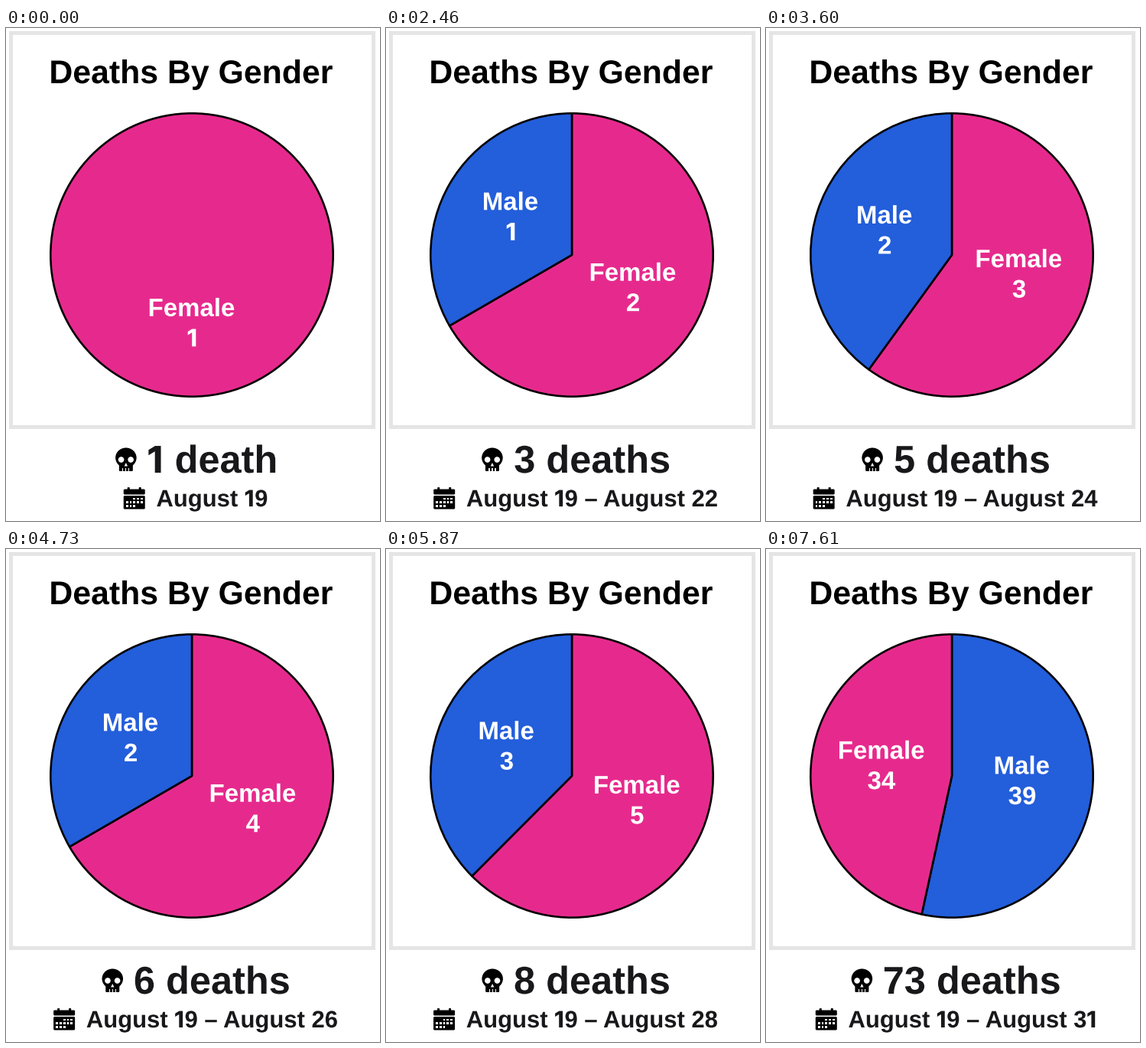
Recreate the animation shown at these times as a matplotlib script. Size 489 px wide and 643 px high, loop 8 s.

```python
from itertools import groupby

import matplotlib.pyplot as plt
import numpy as np
from matplotlib.animation import FuncAnimation
from matplotlib.patches import (Circle, Ellipse, FancyBboxPatch, PathPatch, Polygon,
                                Rectangle, Wedge)
from matplotlib.path import Path
from matplotlib.textpath import TextPath

W, H, DPI = 489, 643, 64
LOOP, STEP = 8000, 20
PX = 72 / DPI

PINK, BLUE, INK, GREY = "#e62a8d", "#235edb", "#18181b", "#e5e5e5"
CX, CY, R = 243, 296, 184.7
ROW_CENTER = 247.5

# One entry per day from August 19; the first day is held longer
DAILY = "F F M - F M - F F M F".split() + ["F" * 4 + "M" * 4, "F" * 24 + "M" * 32]
FIRST_DAY, HOLD, DAY_MS = 19, 1240, 577

# A footless numeral one, in em units
ONE = [(.35, 0), (.35, .692), (.2, .692), (.03, .588), (.03, .45), (.195, .55), (.195, 0)]
ONE_ADVANCE = .43

plt.rcParams["font.family"] = "Liberation Sans"
plt.rcParams["font.weight"] = "bold"

fig = plt.figure(figsize=(W / DPI, H / DPI), dpi=DPI, facecolor="white")
ax = fig.add_axes([0, 0, 1, 1])
ax.set_xlim(0, W)
ax.set_ylim(H, 0)
ax.axis("off")


def advance(s, size):
    right = lambda t: TextPath((0, 0), t, size=size).vertices[:, 0].max()
    return right(s + "n") - right("n")


def outline(s, size):
    """Text outline with y pointing down and ink starting at x = 0, and its width."""
    one = Path(ONE + ONE[:1], closed=True)
    x, verts, codes = 0, [], []
    for run in ("".join(g) for _, g in groupby(s, lambda c: c == "1" or -ord(c) * 0)):
        for part in (run if "1" in run else [run]):
            path = one if part == "1" else TextPath((0, 0), part, size=size)
            scale = size if part == "1" else 1
            if len(path.vertices):
                verts.append(path.vertices * scale + [x, 0])
                codes.append(path.codes)
            x += ONE_ADVANCE * size if part == "1" else advance(part, size)
    verts, codes = np.concatenate(verts), np.concatenate(codes)
    ink = verts[codes != Path.CLOSEPOLY, 0]
    return (verts - [ink.min(), 0]) * [1, -1], codes, np.ptp(ink)


def put(shape, x, y, color):
    verts, codes, _ = shape
    return ax.add_patch(PathPatch(Path(verts + [x, y], codes), fc=color, lw=0))


def centered(s, size, x, y, color):
    shape = outline(s, size)
    return put(shape, x - shape[2] / 2, y, color)


def fill(patch, color="black"):
    patch.set(facecolor=color, linewidth=0)
    return ax.add_patch(patch)


def box(x, y, w, h, color="black"):
    return fill(Rectangle((x, y), w, h), color)


def round_box(x, y, w, h, r):
    return fill(FancyBboxPatch((x + r, y + r), w - 2 * r, h - 2 * r,
                               boxstyle=f"round,pad={r}"))


def skull(x):
    mid, y = x + 14, 547.5
    parts = [fill(Ellipse((mid, y + 13), 27.5, 26)), round_box(mid - 9, y + 19, 18, 11.5, 1.2)]
    parts += [fill(Circle((mid + dx, y + 15.5), 3.8), "white") for dx in (-6.3, 6.3)]
    nose = [(mid, y + 19.5), (mid + 2.2, y + 24), (mid - 2.2, y + 24)]
    parts.append(fill(Polygon(nose), "white"))
    parts += [box(mid + dx - .6, y + 26, 1.2, 4.8, "white") for dx in (-4, 0, 4)]
    return parts


def calendar(x):
    y = 599
    parts = [round_box(x + dx, y, 3, 5, .8) for dx in (5, 20)]
    parts += [round_box(x, y + 2.5, 28, 7, 1.5), round_box(x, y + 11, 28, 17.5, 1.5)]
    for day in range(2, 13):
        r, c = divmod(day, 5)
        parts.append(box(x + 3 + 4.8 * c, y + 13.5 + 4.8 * r, 2.8, 2.8, "white"))
    return parts


def row(icon, s, size, y):
    shape = outline(s, size)
    offset = 28 + 15.5
    left = ROW_CENTER - (offset + shape[2]) / 2
    return icon(left) + [put(shape, left + offset, y, INK)]


def pie(female, male):
    slices = sorted([("Female", female, PINK), ("Male", male, BLUE)], key=lambda s: -s[1])
    parts, labels, a = [], [], -90
    for name, n, color in slices:
        if n == 0:
            continue
        b = a + 360 * n / (female + male)
        parts.append(ax.add_patch(Wedge((CX, CY), R, a, b, fc=color, ec="black",
                                        lw=2.6 * PX, joinstyle="round")))
        mid = np.radians((a + b) / 2)
        labels.append((name, n, CX + R / 2 * np.cos(mid), CY + R / 2 * np.sin(mid)))
        a = b
    for name, n, x, y in labels:
        parts.append(centered(name, 33, x, y - 12.5, "white"))
        parts.append(centered(str(n), 33, x, y + 27, "white"))
    return parts


def scene(k):
    log = "".join(DAILY[:k + 1])
    female, male = log.count("F"), log.count("M")
    total = female + male
    deaths = f"{total} death" + ("s" if total > 1 else "")
    dates = f"August {FIRST_DAY}" + (f" – August {FIRST_DAY + k}" if k else "")
    return pie(female, male) + row(skull, deaths, 50.5, 580) + row(calendar, dates, 31, 624)


ax.add_patch(Rectangle((5.5, 5.5), 474.5, 514.5, fc="white", ec=GREY, lw=5 * PX))
centered("Deaths By Gender", 42.8, 243, 72, "black")
scenes = [scene(k) for k in range(len(DAILY))]


def update(i):
    t = (i + .5) * STEP
    now = int(max(0, (t - HOLD) // DAY_MS + 1))
    for k, parts in enumerate(scenes):
        for part in parts:
            part.set_visible(k == now)
    return []


anim = FuncAnimation(fig, update, frames=LOOP // STEP, interval=STEP,
                     init_func=lambda: update(0), repeat=True, repeat_delay=0)
plt.show()
```
